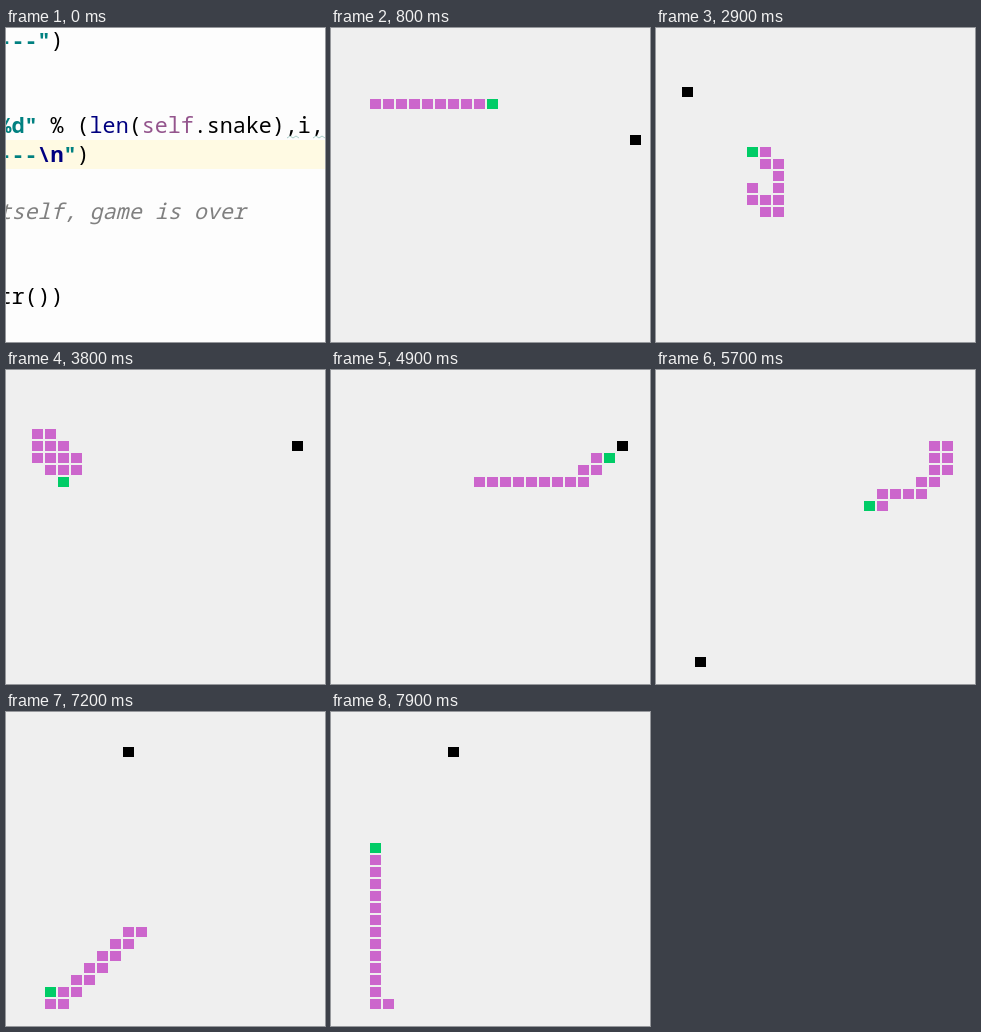
Animation, 319 px wide and 314 px high, one loop 8 s. Source, as an HTML page:

```html
<!DOCTYPE html>
<html lang="en">
<head>
<meta charset="utf-8">
<title>Snake autoplay</title>
<style>
  html, body { margin: 0; width: 100%; height: 100%; overflow: hidden; background: #efefef; }
  svg { display: block; width: 319px; height: 314px; }
  text { font: 21.7px "Noto Sans Mono", "DejaVu Sans Mono", monospace; white-space: pre; fill: #000; }
  .str { fill: #008080; font-weight: 700; }
  .esc { fill: #000080; font-weight: 700; }
  .fn { fill: #000080; }
  .self { fill: #94558d; }
  .note { fill: #808080; font-style: italic; }
</style>
</head>
<body>
<svg viewBox="0 0 319 314">
  <g id="code">
    <rect width="319" height="314" fill="#fdfdfd"/>
    <rect y="112" width="319" height="29" fill="#fffae3"/>
    <text x="-7.5" y="20"><tspan class="str">---"</tspan>)</text>
    <text x="-7.5" y="105"><tspan class="str">%d"</tspan> % (<tspan class="fn">len</tspan>(<tspan class="self">self</tspan>.snake),i,</text>
    <text x="-7.5" y="134"><tspan class="str">---</tspan><tspan class="esc">\n</tspan><tspan class="str">"</tspan>)</text>
    <text x="-7.5" y="191" class="note">tself, game is over</text>
    <text x="-7.5" y="276">tr())</text>
    <path d="M281 110l3 -2 3 2 3 -2 3 2M307 110l3 -2 3 2 3 -2 3 2" fill="none" stroke="#a9cdc9"/>
  </g>
  <g id="game">
    <rect width="319" height="314" fill="#efefef"/>
  </g>
</svg>
<script>
const LOOP = 8000, TICK = 100, START = 200;
const COLS = 24, ROWS = 26;
const FOODS = [[23, 9], [9, 15], [2, 5], [22, 6], [3, 24], [9, 3]];
// Vertical moves come first, so they win ties.
const MOVES = [[0, -1], [0, 1], [-1, 0], [1, 0]];
// Moves made so far at a given time; the game's pace drifts slightly.
const PACE = [[200, 0.5], [4600, 77.2], [6400, 107.8], [7900, 134.5]];

const code = document.getElementById("code");
const game = document.getElementById("game");
const same = (a, b) => a[0] === b[0] && a[1] === b[1];
const dist = (a, b) => (a[0] - b[0]) ** 2 + (a[1] - b[1]) ** 2;

// The snake greedily takes the free neighbour closest to the food.
function nextHead(snake, food) {
  const [x, y] = snake[0];
  return MOVES
    .map(([dx, dy]) => [(x + dx + COLS) % COLS, (y + dy + ROWS) % ROWS])
    .filter(cell => !snake.some(part => same(part, cell)))
    .sort((a, b) => dist(a, food) - dist(b, food))[0];
}

function play(count) {
  let snake = Array.from({ length: 10 }, (_, i) => [(2 - i + COLS) % COLS, 6]);
  let meal = 0;
  const states = [{ snake, food: FOODS[0] }];
  while (states.length <= count) {
    const head = nextHead(snake, FOODS[meal]);
    const ate = same(head, FOODS[meal]);
    snake = [head, ...(ate ? snake : snake.slice(0, -1))];
    if (ate) meal++;
    states.push({ snake, food: FOODS[meal] });
  }
  return states;
}

function makeCell(color) {
  const cell = document.createElementNS("http://www.w3.org/2000/svg", "rect");
  cell.setAttribute("width", 11);
  cell.setAttribute("height", 10);
  cell.setAttribute("fill", color);
  return game.appendChild(cell);
}

function place(cell, pos) {
  cell.style.display = pos ? "" : "none";
  if (!pos) return;
  cell.setAttribute("x", pos[0] * 13);
  cell.setAttribute("y", pos[1] * 12 - 1);
}

const states = play(134);
const foodCell = makeCell("#000");
const cells = Array.from({ length: 15 }, (_, i) => makeCell(i ? "#cc66cc" : "#00cc66"));

function stepAt(t) {
  let i = 0;
  while (i < PACE.length - 2 && t > PACE[i + 1][0]) i++;
  const [t0, n0] = PACE[i], [t1, n1] = PACE[i + 1];
  return Math.floor(n0 + (n1 - n0) * (t - t0) / (t1 - t0));
}

function draw(time) {
  const t = Math.floor(time % LOOP / TICK) * TICK;
  const playing = t >= START;
  code.style.display = playing ? "none" : "";
  game.style.display = playing ? "" : "none";
  if (!playing) return;
  const { snake, food } = states[stepAt(t)];
  place(foodCell, food);
  cells.forEach((cell, i) => place(cell, snake[i]));
}

const begin = performance.now();
function frame() {
  draw(performance.now() - begin);
  requestAnimationFrame(frame);
}
frame();
</script>
</body>
</html>
```
